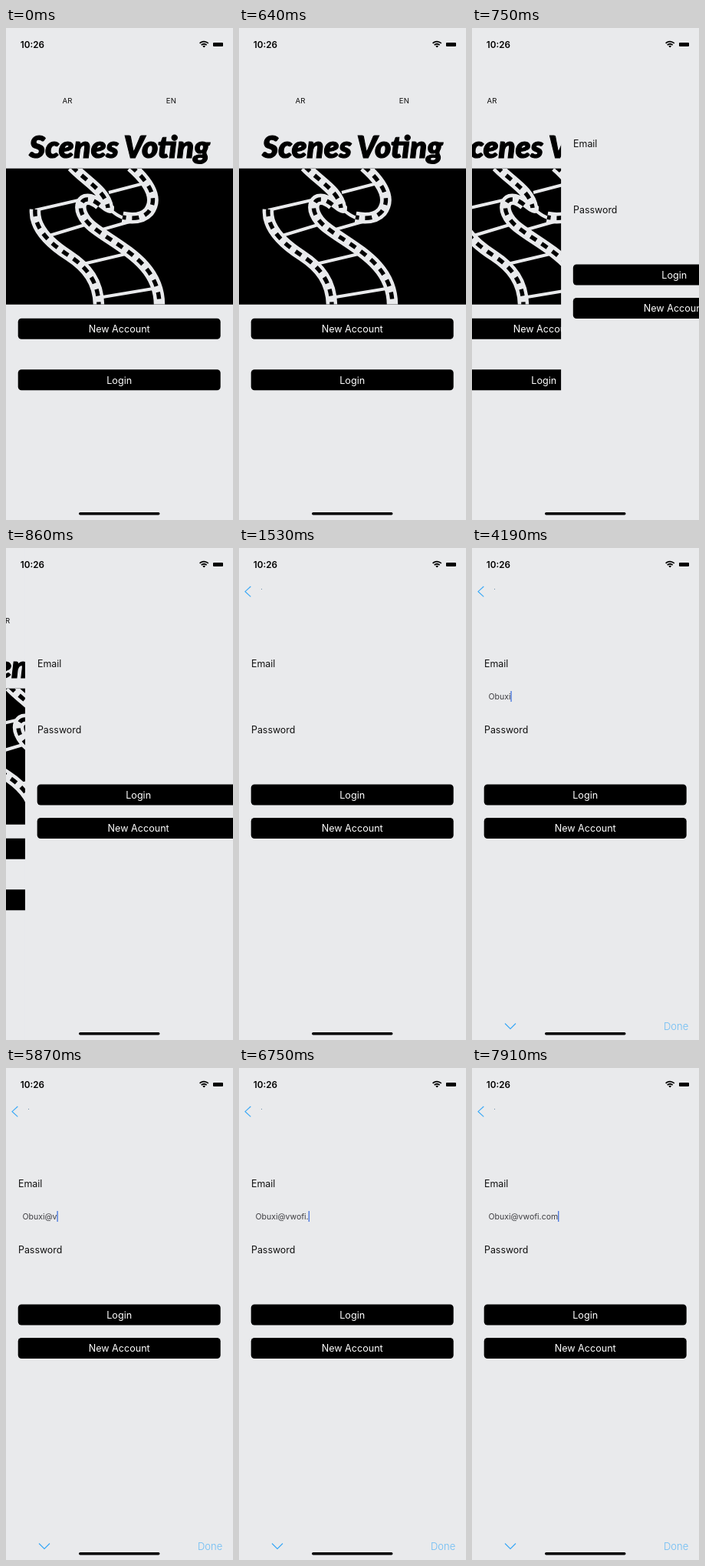
Write an HTML page that moves like this. It is 296 px wide and 640 px high and loops after 8000 ms.

```html
<!DOCTYPE html>
<html lang="en">
<head>
<meta charset="utf-8">
<title>Sign in</title>
<style>
  html, body { margin: 0; width: 100%; height: 100%; overflow: hidden; background: #e9eaec; }
  svg { display: block; width: 296px; height: 640px; font-family: Inter, Roboto, sans-serif; }
  .label { font-size: 12.4px; fill: #111; }
  .button text { font-size: 12.6px; fill: #fff; text-anchor: middle; }
  .lang { font-size: 9.6px; fill: #111; text-anchor: middle; letter-spacing: .2px; }
  .title { font: italic 900 40px Lato, "Open Sans", sans-serif; text-anchor: middle; stroke: #000; stroke-width: 1.1; }
  .band, .edge { fill: none; stroke: #e9eaec; stroke-width: 14.5; }
  .edge { stroke-width: 4.2; }
  .holes { fill: none; stroke: #000; stroke-width: 5.4; stroke-dasharray: 9 8; }
  .blue { fill: none; stroke: #35a7f7; stroke-width: 1.1; }
</style>
</head>
<body>
<svg viewBox="0 0 296 640">
  <defs>
    <clipPath id="poster"><rect y="183" width="296" height="176.5"/></clipPath>
  </defs>
  <rect width="296" height="640" fill="#e9eaec"/>

  <g id="welcome">
    <text class="lang" x="80" y="98">AR</text>
    <text class="lang" x="215.5" y="98">EN</text>
    <text class="title" x="148" y="169">Scenes Voting</text>
    <rect y="182.7" width="296" height="177"/>
    <g id="film" clip-path="url(#poster)">
      <path class="edge" d="M38 237L112 220M50 272L103 256M92 309L160 293M126 350L198 338M134 214L184 201M119 264L168 250"/>
      <path class="edge" stroke-linejoin="round" d="M164 249C148 249 138 238 126 228"/>
      <path fill="#e9eaec" d="M118 216L141 232Q142 246 128 238L112 226Z"/>
    </g>
  </g>

  <g id="login">
    <rect width="296" height="640" fill="#e9eaec"/>
    <text class="label" x="16" y="155.3">Email</text>
    <text class="label" x="16" y="240.8">Password</text>
    <text id="email" x="21.5" y="197" font-size="10.5" fill="#3c3c40"></text>
    <rect id="caret" y="186" width="1.2" height="14" fill="#3568dc"/>
  </g>

  <g id="back">
    <path class="blue" d="M15.3 50L8 56.7L15.3 63.3"/>
    <rect x="29" y="53" width="1" height="1" fill="#6a8ca8"/>
  </g>

  <g id="toolbar">
    <path class="blue" d="M43 618.5L50 625.5L57 618.5"/>
    <text x="250" y="627" font-size="13" font-weight="300" fill="#6bbcf5">Done</text>
  </g>

  <text x="18.8" y="25.5" font-size="11.7" font-weight="600">10:26</text>
  <g fill="none" stroke="#000" stroke-width="1.7">
    <path d="M252.6 19.9Q258.2 15.2 263.8 19.9M254.7 22.2Q258.2 19.3 261.7 22.2"/>
    <path d="M256.3 23.4Q258.2 22 260.1 23.4L258.2 25.4Z" fill="#000" stroke="none"/>
  </g>
  <rect x="270" y="19" width="13" height="5" rx="1"/>
  <rect x="95" y="630" width="105.5" height="3.4" rx="1.7"/>
</svg>
<script>
  const LOOP = 8000;
  const $ = id => document.getElementById(id);

  function add(parent, tag, attrs, text = '') {
    const el = document.createElementNS('http://www.w3.org/2000/svg', tag);
    for (const key in attrs) el.setAttribute(key, attrs[key]);
    el.textContent = text;
    return parent.appendChild(el);
  }

  function button(parent, y, text) {
    const g = add(parent, 'g', { class: 'button' });
    add(g, 'rect', { x: 15.7, y, width: 264, height: 27, rx: 4.5 });
    add(g, 'text', { x: 147.7, y: y + 18.4 }, text);
  }

  button($('welcome'), 377.8, 'New Account');
  button($('welcome'), 444.2, 'Login');
  button($('login'), 307.5, 'Login');
  button($('login'), 351, 'New Account');

  // Perforated bands, back to front
  [
    'M163 180C188 202 199 222 186 239C179 247 168 249 152 246',
    'M86 180C105 200 130 212 133 234',
    'M38 236C36 262 60 282 82 296C105 311 121 330 121 362',
    'M122 230C98 210 86 236 112 258C146 285 201 305 200 362'
  ].forEach(d => {
    add($('film'), 'path', { class: 'band', d });
    add($('film'), 'path', { class: 'holes', d });
  });

  // [time, number of characters shown]
  const ADDRESS = 'Obuxi@vwofi.com';
  const KEYS = [
    [3600, 2], [3780, 3], [4020, 4], [4190, 5], [5170, 7], [5540, 6], [5870, 7],
    [6050, 8], [6180, 9], [6310, 10], [6550, 11], [6750, 12], [6940, 13], [7170, 14], [7400, 15]
  ];

  // Critically damped spring, sampled at a fixed step
  function spring(t, start, step, rate) {
    const u = Math.max(0, Math.floor((t - start) / step) * step) * rate / 1000;
    return 1 - (1 + u) * Math.exp(-u);
  }

  const move = (id, x, y) => $(id).setAttribute('transform', `translate(${x} ${y})`);
  const fade = (id, value) => $(id).setAttribute('opacity', value);

  function caretOpacity(t) {
    if (t < 3600) return 0;
    if (t >= 4710 && t < 5170) return t < 4820 ? 0.4 : 0;
    return 1;
  }

  function draw(t) {
    const push = t < 1090 ? spring(t, 640, 110, 18.65) : 1;
    move('welcome', -0.3 * 296 * push, 0);
    move('login', 296 * (1 - push), 0);
    fade('back', t < 970 ? 0 : t < 1090 ? 0.5 : 1);

    const rise = t < 2870 ? spring(t, 2053, 117, 11) : 1;
    move('toolbar', 0, 30 * (1 - rise));
    fade('toolbar', t < 2170 ? 0 : 1);

    const count = KEYS.reduce((n, [time, shown]) => t >= time ? shown : n, 0);
    const email = $('email');
    email.textContent = ADDRESS.slice(0, count);
    $('caret').setAttribute('x', 21.5 + (count ? email.getComputedTextLength() : 0));
    fade('caret', caretOpacity(t));
  }

  function tick() {
    draw(performance.now() % LOOP);
    requestAnimationFrame(tick);
  }
  tick();
</script>
</body>
</html>
```
